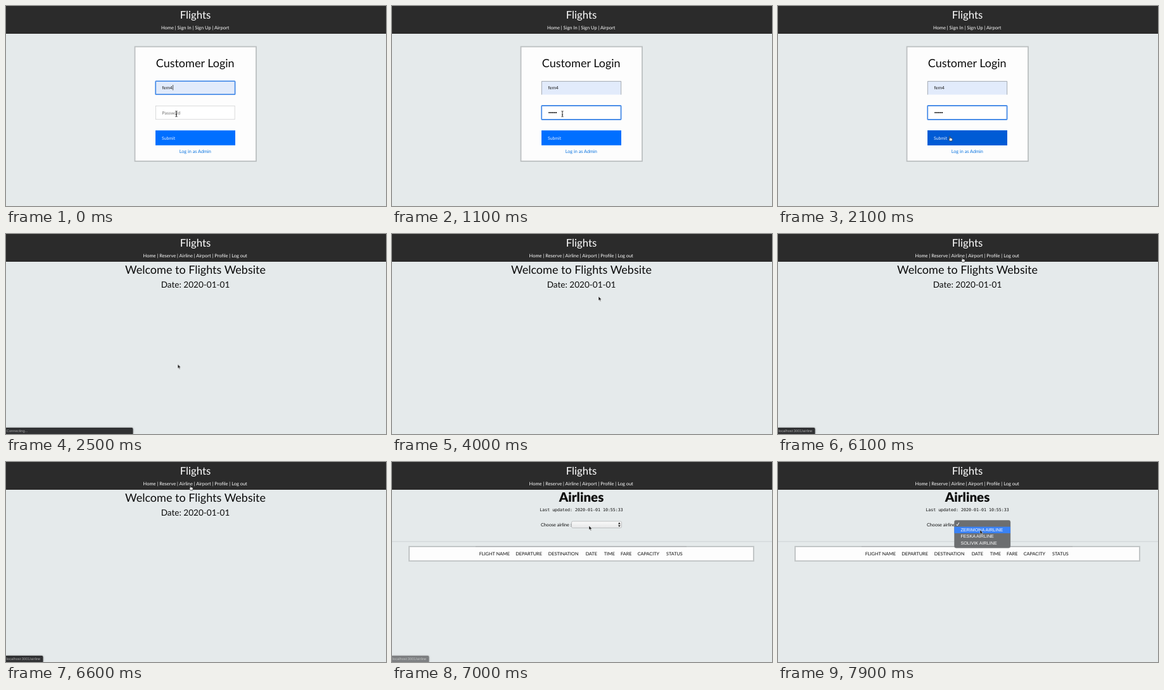
These frames come from a looping animation (600x317 px, 8 s). An HTML page:

```html
<!DOCTYPE html>
<html lang="en">
<head>
<meta charset="utf-8">
<title>Flights</title>
<style>
html, body { margin: 0; width: 100%; height: 100%; overflow: hidden; background: #e5eaeb; }
svg { display: block; width: 600px; height: 317px; }
text { font: 7.3px Lato, "Open Sans", sans-serif; fill: #0c0c0c; text-rendering: geometricPrecision; white-space: pre; }
.mid { text-anchor: middle; }
.bar text { fill: #fff; font-size: 7.48px; }
.bar .brand { font-size: 16.8px; }
.h1 { font-size: 18px; }
.h2 { font-size: 13.55px; }
.black { font-size: 20.5px; font-weight: 900; }
.mono { font: 6.64px "DejaVu Sans Mono", monospace; }
.field { font-size: 6.9px; }
.status text { font: 5.7px "Liberation Sans", Arial, sans-serif; fill: #a8a8a8; }
.status path { fill: #303133; filter: drop-shadow(0 0 1.5px #0006); }
.menu text { font: 7.15px "Liberation Sans", Arial, sans-serif; fill: #fff; }
.ring { fill: none; stroke: #4b8ee8; stroke-width: 1.8; }

/* 8 s loop: 1.25% is 100 ms */
.t { animation: 8s step-end infinite; }
.login { animation-name: login; }
.welcome { animation-name: welcome; }
.airlines { animation-name: airlines; }
.member { animation-name: member; }
.userFocus { animation-name: userFocus; }
.passFocus { animation-name: passFocus; }
.hint { animation-name: hint; }
.typed { animation-name: typed; }
.hover { animation-name: hover; }
.menu { animation-name: menu; }
.pick { animation-name: pick; }
.beam { animation-name: beam; }
.hand { animation-name: hand; }
.arrow { animation-name: arrow; }
.wait { animation: wait 8s linear infinite; }
.link { animation: link 8s linear infinite; }
.cursor { animation: move 8s linear infinite; }

@keyframes login { 0% { opacity: 1 } 27.4%, to { opacity: 0 } }
@keyframes welcome { 0% { opacity: 0 } 27.4% { opacity: 1 } 83.7%, to { opacity: 0 } }
@keyframes airlines { 0% { opacity: 0 } 83.7%, to { opacity: 1 } }
@keyframes member { 0% { opacity: 0 } 27.4%, to { opacity: 1 } }
@keyframes userFocus { 0% { opacity: 1 } 1.2%, to { opacity: 0 } }
@keyframes passFocus { 0% { opacity: 0 } 1.2%, to { opacity: 1 } }
@keyframes hint { 0% { opacity: 1 } 4.95%, to { opacity: 0 } }
@keyframes typed {
  0% { clip-path: inset(0 100% 0 0) }
  4.95% { clip-path: inset(0 80% 0 0) }
  6.2% { clip-path: inset(0 60% 0 0) }
  8.7% { clip-path: inset(0 40% 0 0) }
  9.95% { clip-path: inset(0 20% 0 0) }
  12.4%, to { clip-path: inset(0) }
}
@keyframes hover { 0% { opacity: 0 } 17.4%, to { opacity: 1 } }
@keyframes menu { 0% { opacity: 0 } 96.2%, to { opacity: 1 } }
@keyframes pick { 0% { opacity: 0 } 97.45%, to { opacity: 1 } }
@keyframes beam { 0% { opacity: 1 } 4.95% { opacity: 0 } 13.7% { opacity: 1 } 16.2%, to { opacity: 0 } }
@keyframes hand { 0% { opacity: 0 } 17.4% { opacity: 1 } 27.4% { opacity: 0 } 68.7% { opacity: 1 } 83.7%, to { opacity: 0 } }
@keyframes arrow { 0% { opacity: 0 } 16.2% { opacity: 1 } 17.4% { opacity: 0 } 27.4% { opacity: 1 } 68.7% { opacity: 0 } 83.7%, to { opacity: 1 } }
@keyframes wait { 0%, 27.5% { opacity: 0 } 30%, 33.9% { opacity: 1 } 36.2%, to { opacity: 0 } }
@keyframes link { 0%, 73% { opacity: 0 } 75%, 86.2% { opacity: 1 } 87.5% { opacity: .58 } 89.5%, to { opacity: 0 } }
@keyframes move {
  0%, 13.75% { transform: translate(269px, 171px) }
  16.25% { transform: translate(272px, 189px) }
  18.75% { transform: translate(277px, 209px) }
  22.5%, 43% { transform: translate(271.2px, 206.5px) }
  45% { transform: translate(279px, 184px) }
  47.5% { transform: translate(306px, 131px) }
  50% { transform: translate(326px, 99px) }
  52.5% { transform: translate(341px, 85px) }
  55%, 61.5% { transform: translate(347px, 80px) }
  63.75% { transform: translate(334px, 73px) }
  66.25% { transform: translate(303px, 57px) }
  68.75% { transform: translate(271px, 41px) }
  71.25%, 72.5% { transform: translate(256px, 36px) }
  75% { transform: translate(282px, 37px) }
  76.25%, 82.5% { transform: translate(291px, 37px) }
  85% { transform: translate(299px, 72px) }
  87.5% { transform: translate(311px, 101px) }
  92.5%, 96% { transform: translate(313px, 99px) }
  98.75%, to { transform: translate(319px, 107.5px) }
}
</style>
</head>
<body>
<svg viewBox="0 0 600 317">
  <defs>
    <linearGradient id="sel" x2="0" y2="1">
      <stop stop-color="#fafafa"/><stop offset="1" stop-color="#e6e7e8"/>
    </linearGradient>
  </defs>
  <rect width="600" height="317" fill="#e5eaeb"/>

  <g class="bar">
    <rect width="600" height="44" fill="#2b2b2b"/>
    <text class="mid brand" x="299" y="20">Flights</text>
    <text class="mid t login" x="298.7" y="36.5">Home | Sign In | Sign Up | Airport</text>
    <text class="mid t member" x="298.7" y="36.5">Home | Reserve | Airline | Airport | Profile | Log out</text>
  </g>

  <g class="t login">
    <rect x="203.5" y="64.5" width="191.5" height="181.5" fill="#fdfdfd" stroke="#bcc0c1" stroke-width="1.8"/>
    <text class="mid h1" x="298.7" y="97">Customer Login</text>

    <rect x="236" y="119" width="126" height="21.5" fill="#e2ebfb"/>
    <path class="t passFocus" d="M236.3 140.5V119.4H361.7V140.5" fill="none" stroke="#94999f" stroke-width=".8"/>
    <g class="t userFocus">
      <rect class="ring" x="236.2" y="119.2" width="125.4" height="21" rx=".8"/>
      <rect x="263.4" y="125" width=".7" height="8.5" fill="#111"/>
    </g>
    <text class="field" x="246.5" y="131.7">fern4</text>

    <rect x="236.4" y="158.3" width="124.8" height="21.4" fill="#fff" stroke="#d0d2d3" stroke-width=".8"/>
    <rect class="ring t passFocus" x="236.2" y="158" width="125.4" height="22" rx=".8"/>
    <text class="field t hint" x="246.5" y="171.5" style="fill:#707070">Password</text>
    <g class="t typed" fill="#111">
      <circle cx="248.2" cy="169" r="1.05"/><circle cx="250.9" cy="169" r="1.05"/><circle cx="253.6" cy="169" r="1.05"/><circle cx="256.3" cy="169" r="1.05"/><circle cx="259" cy="169" r="1.05"/>
    </g>

    <rect x="236" y="197.2" width="126" height="23.6" fill="#006fff"/>
    <rect class="t hover" x="236" y="197.2" width="126" height="23.6" fill="#005bd5"/>
    <text class="field" x="246" y="211.5" style="fill:#e8f1ff">Submit</text>
    <text class="mid" x="298.8" y="232.8" style="fill:#0a74e0">Log in as Admin</text>
  </g>

  <g class="t welcome">
    <text class="mid h1" x="299" y="62.6">Welcome to Flights Website</text>
    <text class="mid h2" x="299" y="85.4">Date: 2020-01-01</text>
  </g>

  <g class="t airlines">
    <text class="mid black" x="299" y="63">Airlines</text>
    <text class="mid mono" x="299" y="78">Last updated: 2020-01-01 10:55:33</text>
    <text x="235" y="101.5" style="font-size:7.2px">Choose airline :</text>
    <rect x="283.5" y="94" width="79" height="10.5" rx="2" fill="url(#sel)" stroke="#b4b7b8" stroke-width=".8"/>
    <path d="M357 98.4l1.9-2.8 1.9 2.8zM357 100.2l1.9 2.8 1.9-2.8z" fill="#222"/>
    <rect y="125.6" width="600" height=".9" fill="#cbd0d1"/>
    <rect x="27" y="134" width="544" height="22.8" fill="#fdfdfd" stroke="#c2c6c7" stroke-width="2"/>
    <rect x="132" y="133.6" width="333" height="1" fill="#aeb2b3"/>
    <text y="147.6"><tspan x="137.7">FLIGHT NAME</tspan><tspan x="195.3">DEPARTURE</tspan><tspan x="246.7">DESTINATION</tspan><tspan x="305.7">DATE</tspan><tspan x="334.7">TIME</tspan><tspan x="361">FARE</tspan><tspan x="387.7">CAPACITY</tspan><tspan x="433">STATUS</tspan></text>
  </g>

  <g class="t menu">
    <rect x="278.3" y="92.3" width="88.7" height="44" rx="3" fill="#6c6e70" stroke="#8f9293" stroke-width=".5"/>
    <rect class="t pick" x="278.3" y="102.6" width="88.7" height="10.3" fill="#3a82f6"/>
    <path d="M281.8 98.8l1.4 2 2.6-4.7" fill="none" stroke="#fff" stroke-width="1"/>
    <text x="288.5" y="110">ZERIMONA AIRLINE</text>
    <text x="288.5" y="120.4">FESKA AIRLINE</text>
    <text x="288.5" y="130.9">SOLIVIK AIRLINE</text>
  </g>

  <g class="status wait">
    <path d="M0 307H198.500Q200.500 307 200.500 309V317H0z"/>
    <text x=".8" y="314">Connecting...</text>
  </g>
  <g class="status link">
    <path d="M0 307H56.500Q58.500 307 58.500 309V317H0z"/>
    <text x=".8" y="314">localhost:3001/airline</text>
  </g>

  <g class="cursor" stroke-linejoin="round">
    <path class="t beam" d="M-1.500-4.500Q0-4.500 0-3.500Q0-4.500 1.500-4.500M0-3.500V3.500M-1.500 4.500Q0 4.500 0 3.500Q0 4.500 1.500 4.500M-1 1.300H1" fill="none" stroke="#111" stroke-width=".9"/>
    <path class="t arrow" d="M0 0V6.600L1.500 5.300L2.600 7.800L3.700 7.300L2.600 4.900H4.700z" fill="#0a0a0a" stroke="#fff" stroke-width=".5"/>
    <path class="t hand" d="M-.7.500Q0-.500.700.500V3Q1.500 2.400 2 3.200Q2.800 2.700 3.200 3.500Q4.300 3.200 4.200 4.500Q4.200 6.200 3.400 7.500H0L-1.900 4.700Q-1.700 3.800-.7 4.700z" fill="#fff" stroke="#111" stroke-width=".7"/>
  </g>
</svg>
</body>
</html>
```
